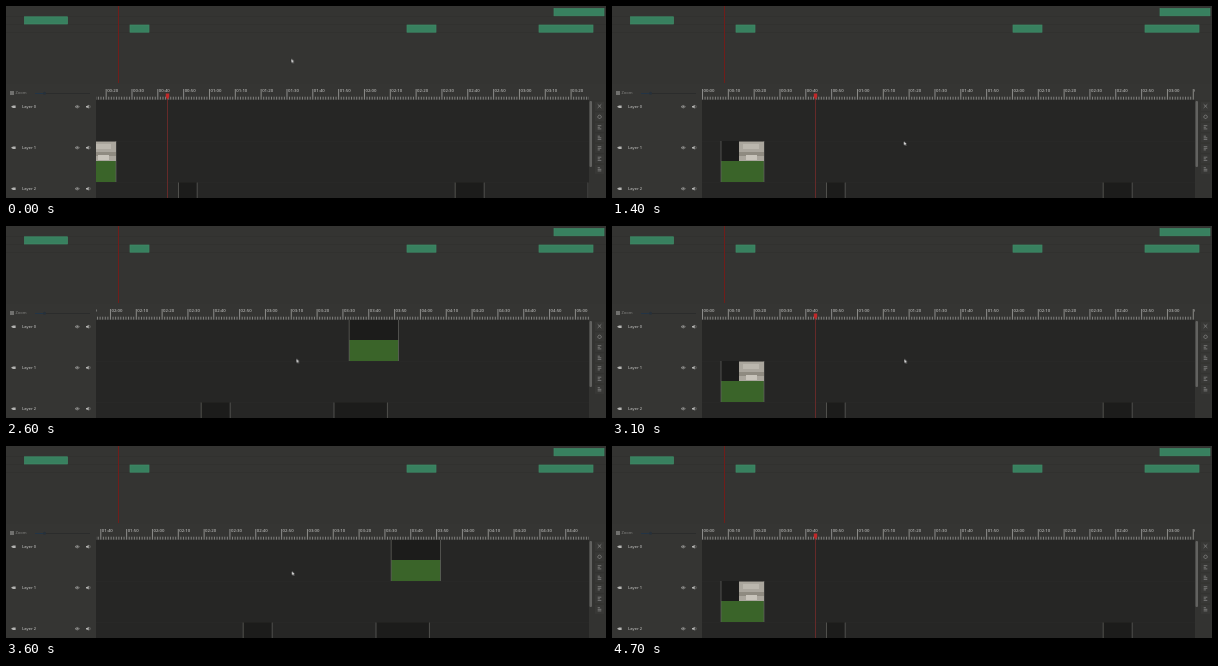
An HTML page that plays this animation: 600 by 192 pixels, repeating every 5900 ms.

```html
<!DOCTYPE html>
<html lang="en">
<head>
<meta charset="utf-8">
<title>Timeline scroll</title>
<style>
  html, body { margin: 0; width: 100%; height: 100%; overflow: hidden; background: #343432; }
  svg { display: block; }
  text { font-family: "Open Sans", "Noto Sans", sans-serif; font-weight: 600; fill: #b0b0ae; }
</style>
</head>
<body>
<svg width="600" height="192" viewBox="0 0 600 192">
  <rect width="600" height="192" fill="#353533"/>
  <rect width="600" height="78" fill="#343432"/>
  <path d="M0 10.5H600M0 18.5H600M0 26.5H600" stroke="#30302e" stroke-width=".7"/>
  <g id="overview" fill="#38805f" stroke="#3f8a67" stroke-width=".7"></g>
  <path d="M112.5 0V77" stroke="#701d1a"/>

  <rect x="4" y="85" width="4" height="4" fill="#70706e"/>
  <text x="9.5" y="88.4" font-size="4" style="fill:#757573">Zoom</text>
  <path d="M29 87.5H84" stroke="#2b2c2c"/>
  <path d="M29 87.5H40" stroke="#223446"/>
  <circle cx="38.5" cy="87.3" r="1.5" fill="#26303a"/>
  <g id="heads"></g>

  <rect x="90" y="94" width="493" height="98" fill="#262625"/>
  <path d="M90 135.5H583M90 176.5H583" stroke="#2a2a29" stroke-width=".7"/>
  <svg x="90" y="78" width="493" height="114" viewBox="90 78 493 114">
    <g id="scroll"></g>
  </svg>

  <rect x="583" y="94" width="17" height="98" fill="#333331"/>
  <rect x="583.5" y="95" width="2.5" height="66" rx="1" fill="#626260"/>
  <g id="tools"></g>
  <path id="cursor" d="M0 0V4.4L1.1 3.6L1.9 5L2.6 4.7L2 3.3H3.2Z"
        fill="#f4f4f4" stroke="#151515" stroke-width=".4"/>
</svg>
<script>
const LOOP = 5900, TICK = 100, NOTCH = 42.27, SECOND = 2.583, LEFT = 90.5, ROW = 41;
const $ = id => document.getElementById(id);
const range = n => [...Array(n).keys()];
const rect = (x, y, w, h, fill) =>
  `<rect x="${x}" y="${y}" width="${w}" height="${h}"${fill ? ` fill="${fill}"` : ''}/>`;
const line = (d, color, width = 1) =>
  `<path d="${d}" fill="none" stroke="${color}" stroke-width="${width}"/>`;
const label = (x, y, size, text) => `<text x="${x}" y="${y}" font-size="${size}">${text}</text>`;

// Overview bars: left, row, width
$('overview').innerHTML = [[18.5, 1, 43], [124, 2, 19], [401, 2, 29], [533, 2, 54], [548, 0, 50]]
  .map(([x, row, w]) => rect(x, 2.6 + row * 8.2, w, 7.2)).join('');

// Track headers: camera, name, eye, speaker
$('heads').innerHTML = range(3).map(i =>
  `<g transform="translate(0 ${100.7 + i * ROW})" fill="#b4b4b2">` +
  '<path d="M5 0L7-1.2H9.6V1.2H7Z"/>' + label(16, 1.4, 4, `Layer ${i}`) +
  '<circle cx="71.2" r=".7"/>' + line('M69 0Q71.2-2.6 73.4 0Q71.2 2.6 69 0Z', '#969694', .7) +
  '<path d="M80-.7H81L82.7-1.9V1.9L81 .7H80Z"/>' + line('M83.6-1.5Q84.8 0 83.6 1.5', '#8c8c8a', .6) +
  '</g>').join('');

// Tool buttons: scissors, ring, then menus of uneven bars
const bars = i => range(3).map(k => `M-1.8 ${k * 1.6 - 1.6}H${(i + k) % 3 ? 1.8 : .4}`).join('');
const glyph = i => ['M-1.8-2L1.8 1.6M-1.8 1.6L1.8-2', 'M0-1.7A1.7 1.7 0 1 0 .1-1.7'][i] || bars(i);
$('tools').innerHTML = range(7).map(i =>
  `<g transform="translate(593.5 ${100.3 + i * 10.5})">` +
  rect(-4.5, -4.5, 9, 9, '#383836') + line(glyph(i), '#858583', .8) + '</g>').join('');

// Ruler: one tick per second, a label every ten
const pad = n => String(n).padStart(2, '0');
const ruler = range(350).map(s => {
  const x = LEFT + s * SECOND;
  if (s % 10) return line(`M${x} 90.7V93.6`, '#969694', .8);
  return line(`M${x} 83V93.6`, '#a2a2a0', .8) +
    label(x + 1, 86.4, 4.3, `${pad(s / 60 | 0)}:${pad(s % 60)}`);
}).join('');

// Clips: dark preview above, green waveform below
const edges = (x, y, w) => line(`M${x} ${y}V${y + ROW}M${x + w} ${y}V${y + ROW}`, '#666664', .7);
const dark = (x, w) => rect(x, 176.5, w, 16, '#1c1c1b') + edges(x, 176.5, w);
const clip = (x, y, w) =>
  rect(x, y, w, 20, '#1c1c1b') + rect(x, y + 20, w, 21, '#3a6429') + edges(x, y, w);
const photo = rect(127, 135.5, 25, 19.5, '#aaa69d') + rect(127, 146, 25, 4, '#8f8b81') +
  rect(131, 138, 16, 5, '#bbb7ae') + rect(134, 149, 11, 5, '#c8c4bb');

$('scroll').innerHTML = ruler + clip(109, 135, 43) + photo + clip(639.2, 94, 49.3) +
  dark(214.5, 18.7) + dark(491.2, 29) + dark(624, 53.4) +
  line('M203.5 94V192', '#652a29') +
  '<path d="M201.8 87.5H205.2V91L203.5 93.8L201.8 91Z" fill="#c02829"/>';

// Each move eases to a wheel position and pointer place: start, end, notches, x, y
const start = [1, 285.2, 52.5];
const moves = [
  [0, 600, 6, 285.2, 116], [600, 700, 6, 291.3, 135],
  [1000, 1400, 0, 291.7, 135], [1700, 2300, 9, 289.7, 132.4],
  [2400, 3000, 0, 292.2, 132.7], [3200, 3700, 7, 285, 124], [4000, 4600, 0, 293, 125.8]
];
const ease = p => p * p * (3 - 2 * p);
const pose = t => moves.reduce((now, [from, to, ...goal]) => {
  const k = ease(Math.min(1, Math.max(0, (t - from) / (to - from))));
  return now.map((v, i) => v + (goal[i] - v) * k);
}, start);

const play = (id, style) => {
  const frames = range(LOOP / TICK + 1).map(i => ({
    offset: i * TICK / LOOP, easing: 'step-end', ...style(i * TICK)
  }));
  $(id).animate(frames, { duration: LOOP, iterations: Infinity }).startTime = 0;
};
play('scroll', t => ({ transform: `translateX(${-Math.round(Math.round(pose(t)[0]) * NOTCH)}px)` }));
play('cursor', t => {
  const [, x, y] = pose(t);
  return { transform: `translate(${x}px, ${y}px)`, opacity: t < 4700 ? 1 : 0 };
});
</script>
</body>
</html>
```
